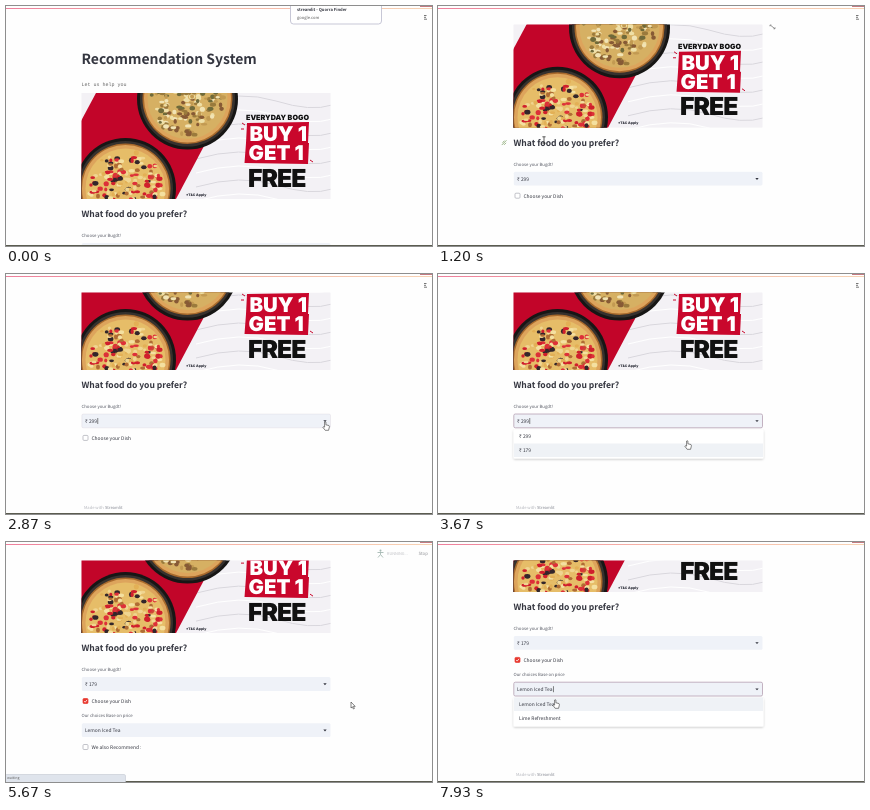
Write an HTML page that moves like this. It is 426 by 240 pixels and loops after 8 s.

```html
<!DOCTYPE html>
<html lang="en">
<head>
<meta charset="utf-8">
<title>Recommendation System</title>
<style>
  html, body { margin: 0; width: 100%; height: 100%; overflow: hidden; background: #fefefe; }
  svg { display: block; width: 100vw; height: 100vh; }
  text { font-family: "Noto Sans CJK JP", "Noto Sans CJK SC", "Noto Sans", sans-serif; fill: #33353f;
         text-rendering: geometricPrecision; white-space: pre; }
  .bold { font-weight: 700; }
  .mono { font-family: "Liberation Mono", monospace; }
  .ad { font-family: Inter, "Open Sans", sans-serif; font-weight: 900; }
</style>
</head>
<body>
<svg id="stage" viewBox="0 0 426 240">
  <defs>
    <clipPath id="view"><rect y="18.5" width="426" height="222"/></clipPath>
    <clipPath id="banner"><rect x="75.5" y="87" width="249" height="106"/></clipPath>
    <linearGradient id="strip">
      <stop stop-color="#ee7f9c"/><stop offset=".5" stop-color="#f6b3a6"/><stop offset="1" stop-color="#f8d3b4"/>
    </linearGradient>
    <filter id="shadow" x="-10%" y="-30%" width="120%" height="180%">
      <feDropShadow dx="0" dy="1" stdDeviation="1.3" flood-opacity=".22"/>
    </filter>
  </defs>
</svg>
<script>
const LOOP = 8000;
const stage = document.getElementById('stage');

function add(parent, tag, attrs = {}, content) {
  const node = document.createElementNS('http://www.w3.org/2000/svg', tag);
  for (const key in attrs) node.setAttribute(key, attrs[key]);
  if (content !== undefined) node.textContent = content;
  parent.appendChild(node);
  return node;
}
const group = (parent, attrs) => add(parent, 'g', attrs);
const rect = (parent, x, y, width, height, fill, more) =>
  add(parent, 'rect', { x, y, width, height, fill, ...more });
const path = (parent, d, more) => add(parent, 'path', { d, ...more });
const label = (parent, x, y, size, content, more) =>
  add(parent, 'text', { x, y, 'font-size': size, ...more }, content);
const show = (node, on) => node.setAttribute('visibility', on ? 'visible' : 'hidden');
const move = (node, x, y) => node.setAttribute('transform', `translate(${x} ${y})`);

// Scrolling page
const view = group(stage, { 'clip-path': 'url(#view)' });
const page = group(view);
label(page, 75.5, 58, 13.95, 'Recommendation System', { class: 'bold' });
label(page, 75.5, 79.5, 5, 'Let us help you', { class: 'mono', style: 'fill:#666' });

function pizza(parent, cx, cy, cheese, toppings, seed) {
  const random = () => (seed = (seed * 16807) % 2147483647) / 2147483647;
  const disc = (r, fill) => add(parent, 'circle', { cx, cy, r, fill });
  disc(50.5, '#171615');
  disc(47.5, '#36312e');
  disc(45, '#a8692c');
  disc(43.5, '#dda45c');
  disc(40, cheese);
  for (let i = 0; i < 210; i++) {
    const angle = random() * Math.PI * 2;
    const reach = Math.sqrt(random()) * 37.5;
    add(parent, 'ellipse', {
      cx: cx + Math.cos(angle) * reach, cy: cy + Math.sin(angle) * reach,
      rx: 1.5 + random() * 1.7, ry: 1.2 + random() * 1.4,
      fill: toppings[i % toppings.length]
    });
  }
}

function drawBanner() {
  const ad = group(page, { 'clip-path': 'url(#banner)' });
  rect(ad, 75, 87, 250, 106, '#f3f1f5');
  for (let i = 0; i < 8; i++) {
    const y = 92 + i * 14;
    path(ad, `M190 ${y + 5}Q235 ${y - 8} 270 ${y + 3}T326 ${y + 7}`,
      { fill: 'none', stroke: i % 2 ? '#ffffff' : '#d9d7dd', 'stroke-width': 1 });
  }
  path(ad, 'M90 87H226L170 193H75V115Z', { fill: '#c20529' });
  pizza(ad, 181.5, 93, '#d6b063', ['#9a7a3c', '#efdfa6', '#6f6a3a', '#c29a52', '#f1e3b4', '#875a35'], 71);
  pizza(ad, 119.5, 182.5, '#e6bd68', ['#f4e0a0', '#d01f2c', '#e3b056', '#33262a', '#f0d590', '#b06c34', '#dd3038'], 29);
  label(ad, 180, 189.5, 3.4, '*T&C Apply', { class: 'ad' });
  const black = { class: 'ad', style: 'fill:#111' }, white = { class: 'ad', style: 'fill:#fff' };
  label(ad, 240, 114, 7.2, 'EVERYDAY BOGO', black);
  path(ad, 'M241 117L303 116L302 137H303L302 158L238.5 157L240 137Z', { fill: '#c9072c' });
  path(ad, 'M239 119l-3-2M238 123h-3M304 154l3 2', { stroke: '#c9072c', 'stroke-width': 1 });
  label(ad, 243.5, 135, 20.4, 'BUY 1', white);
  label(ad, 242.5, 154, 20.4, 'GET 1', white);
  label(ad, 242, 180.5, 24.8, 'FREE', { ...black, 'letter-spacing': -1 });
}
drawBanner();
const expandIcon = path(page, 'M332 91.5v-1.5h1.5M337 92.5v1.5h-1.5M332.3 90.3l4.3 3.4',
  { fill: 'none', stroke: '#666', 'stroke-width': 0.7 });

label(page, 75.5, 211, 8.55, 'What food do you prefer?', { class: 'bold' });
const anchor = path(page, 'M64 210l2-2M66.2 207.8l2-2M64.8 207.6l1.5-1.5M66.3 209.8l1.5-1.5',
  { stroke: '#93b07e', 'stroke-width': 0.9, 'stroke-linecap': 'round' });

function selectBox(parent, y, title, value) {
  label(parent, 75.5, y - 6.2, 4.3, title, { style: 'fill:#555863' });
  const box = rect(parent, 75.8, y, 248.7, 13.8, '#eff2f8', { rx: 1.5, stroke: '#b5a0b3', 'stroke-width': 0.8 });
  const text = label(parent, 79, y + 8.8, 4.9, value);
  const caret = rect(parent, 0, y + 4, 0.6, 6, '#333');
  path(parent, `M317.3 ${y + 6.2}h3.4l-1.7 1.9Z`, { fill: '#33353f' });
  return {
    text,
    focus(amount) {
      box.setAttribute('stroke-opacity', amount);
      caret.setAttribute('x', 79.5 + text.getComputedTextLength());
      show(caret, amount > 0);
    }
  };
}

function checkBox(parent, y, title) {
  const box = rect(parent, 77, y - 2.6, 5, 5, '#fff', { rx: 1, stroke: '#a9abb3', 'stroke-width': 0.7 });
  const tick = path(parent, `M78.2 ${y}l1 1.1l1.8-2.3`, { fill: 'none', stroke: '#fff', 'stroke-width': 0.8 });
  label(parent, 85.5, y + 1.9, 4.9, title);
  return on => {
    box.setAttribute('fill', on ? '#e8382f' : '#fff');
    box.setAttribute('stroke', on ? '#e8382f' : '#a9abb3');
    show(tick, on);
  };
}

function dropdown(y, options) {
  const menu = group(page);
  rect(menu, 75.5, y, 250, options.length * 14 + 1, '#fff', { rx: 1.5, filter: 'url(#shadow)' });
  const hover = rect(menu, 76, y, 249, 13.5, '#eff2f6');
  options.forEach((option, i) => label(menu, 81, y + 8.3 + i * 14, 4.9, option));
  return (on, active) => {
    menu.setAttribute('display', on ? 'inline' : 'none');
    hover.setAttribute('y', y + active * 14);
  };
}

const budget = selectBox(page, 237, 'Choose your Bugdt!', '₹ 299');
const setDish = checkBox(page, 261, 'Choose your Dish');
const extra = group(page);
const dish = selectBox(extra, 283.2, 'Our choices Base on price', 'Lemon Iced Tea');
checkBox(extra, 307, 'We also Recommend :')(false);
const footer = group(page);
label(footer, 78, 1.5, 4.1, 'Made with', { style: 'fill:#b4b6bd' });
label(footer, 99, 1.5, 4.1, 'Streamlit', { style: 'fill:#858892' });
const budgetMenu = dropdown(252.5, ['₹ 299', '₹ 179']);
const dishMenu = dropdown(298.5, ['Lemon Iced Tea', 'Lime Refreshment']);

// Fixed browser parts
rect(stage, 0, 2, 426, 1, 'url(#strip)');
rect(stage, 414, 0, 12, 0.8, '#b65a63');
rect(stage, 0, 239, 426, 1, '#5b5c50');
const tooltip = group(stage);
rect(tooltip, 284.5, -6, 91, 24, '#fff', { rx: 3, stroke: '#b9b9cc', 'stroke-width': 0.8 });
label(tooltip, 291, 5.2, 4.1, 'streamlit - Quorra Finder', { class: 'bold' });
label(tooltip, 291, 12.5, 4.1, 'google.com', { style: 'fill:#555' });
const menuIcon = path(stage, 'M418 9.5h2.5M418 11.3h2M418 13.2h3', { stroke: '#555', 'stroke-width': 0.8 });

const running = group(stage);
add(running, 'circle', { cx: 374.5, cy: 8.5, r: 1, fill: '#78958c' });
const runner = path(running, '', { fill: 'none', stroke: '#78958c', 'stroke-width': 0.9 });
label(running, 381, 12.6, 3.9, 'RUNNING...', { style: 'fill:#9b9da4' });
label(running, 412.5, 13, 4.4, 'Stop', { style: 'fill:#55575f' });

const status = group(stage);
rect(status, -1, 232.5, 120.5, 9, '#dfe4ec', { rx: 1.5, stroke: '#c3c8d2', 'stroke-width': 0.6 });
label(status, 1, 237, 3.6, 'waiting', { style: 'fill:#666' });

const outline = { fill: '#fff', stroke: '#333', 'stroke-width': 0.6, 'stroke-linejoin': 'round' };
const pointers = {
  arrow: path(stage, 'M-1-3v6l1.4-1.2l1 2.2l1-.5l-1-2.1h1.8Z', outline),
  hand: path(stage, 'M-1.4-4q.8-.7 1.3 0v2.8l3 .7q.7.5.4 1.8l-.7 3h-3.4l-2.3-3q0-1 1.7-.2Z', outline),
  beam: path(stage, 'M-1.6-3.2h3.2M0-3.2v6.4M-1.6 3.2h3.2', { stroke: '#333', 'stroke-width': 0.8 })
};

// Motion: rows of [time, values...], eased between neighbours.
// The pointer rests while the wheel scrolls the page beneath it.
const scrollKeys = [[0, 0], [800, 0], [1406, 97], [5580, 97], [6030, 143]];
const cursorKeys = [
  [0, 330, -10], [150, 330, -10], [750, 106, 134], [1500, 106, 134], [2700, 320, 152],
  [3050, 320, 152], [3650, 250, 171], [4000, 250, 171], [4350, 205, 130], [4500, 205, 130],
  [4950, 81, 165], [5120, 81, 165], [5550, 346, 163], [6050, 346, 163], [6700, 246, 148],
  [7250, 246, 148], [7800, 118, 162]
];

function sample(keys, t) {
  const next = keys.findIndex(key => key[0] > t);
  if (next < 0) return keys[keys.length - 1].slice(1);
  const [from, to] = [keys[next - 1], keys[next]];
  const u = (t - from[0]) / (to[0] - from[0]);
  const eased = u * u * (3 - 2 * u);
  return from.slice(1).map((value, i) => value + (to[i + 1] - value) * eased);
}
const within = (t, start, end) => t >= start && t < end;
const fadeIn = (t, start) => Math.min(1, Math.max(0, (t - start) / 200));

function render(t) {
  const [scroll] = sample(scrollKeys, t);
  const [x, y] = sample(cursorKeys, t);
  const checked = t >= 5050, loaded = t >= 5350;
  const busy = within(t, 4150, 4700) || within(t, 5100, 5900);

  move(page, 0, -scroll);
  move(footer, 0, loaded ? 375.3 : 330.3);
  show(tooltip, t < 250);
  show(anchor, within(t, 1100, 1600) || within(t, 4250, 4600));
  show(expandIcon, within(t, 600, 1300));
  show(menuIcon, t < 4150);

  budget.text.textContent = t < 4000 ? '₹ 299' : '₹ 179';
  budget.focus(checked ? 0 : fadeIn(t, 2830));
  dish.focus(fadeIn(t, 7300));
  setDish(checked);
  extra.setAttribute('display', loaded ? 'inline' : 'none');
  budgetMenu(within(t, 2950, 4000), y > 168 ? 1 : 0);
  dishMenu(t >= 7350, 0);

  running.setAttribute('display', busy ? 'inline' : 'none');
  running.setAttribute('opacity', loaded ? 0.65 : 1);
  const stride = Math.floor(t / 130) % 2 ? 2.5 : 1;
  runner.setAttribute('d', `M371.5 10.5h6M374.5 9.5v3l${-stride} 3M374.5 12.5l${stride} 3`);
  status.setAttribute('display', busy ? 'inline' : 'none');

  const kind = within(t, 1100, 1600) || within(t, 6650, 7300) ? 'beam'
    : within(t, 2600, 4050) || within(t, 4850, 5200) || t >= 7350 ? 'hand' : 'arrow';
  for (const name in pointers) {
    show(pointers[name], name === kind && t > 150);
    move(pointers[name], x, y);
  }
}

function tick(now) {
  render(now % LOOP);
  requestAnimationFrame(tick);
}
render(0);
requestAnimationFrame(tick);
</script>
</body>
</html>
```
